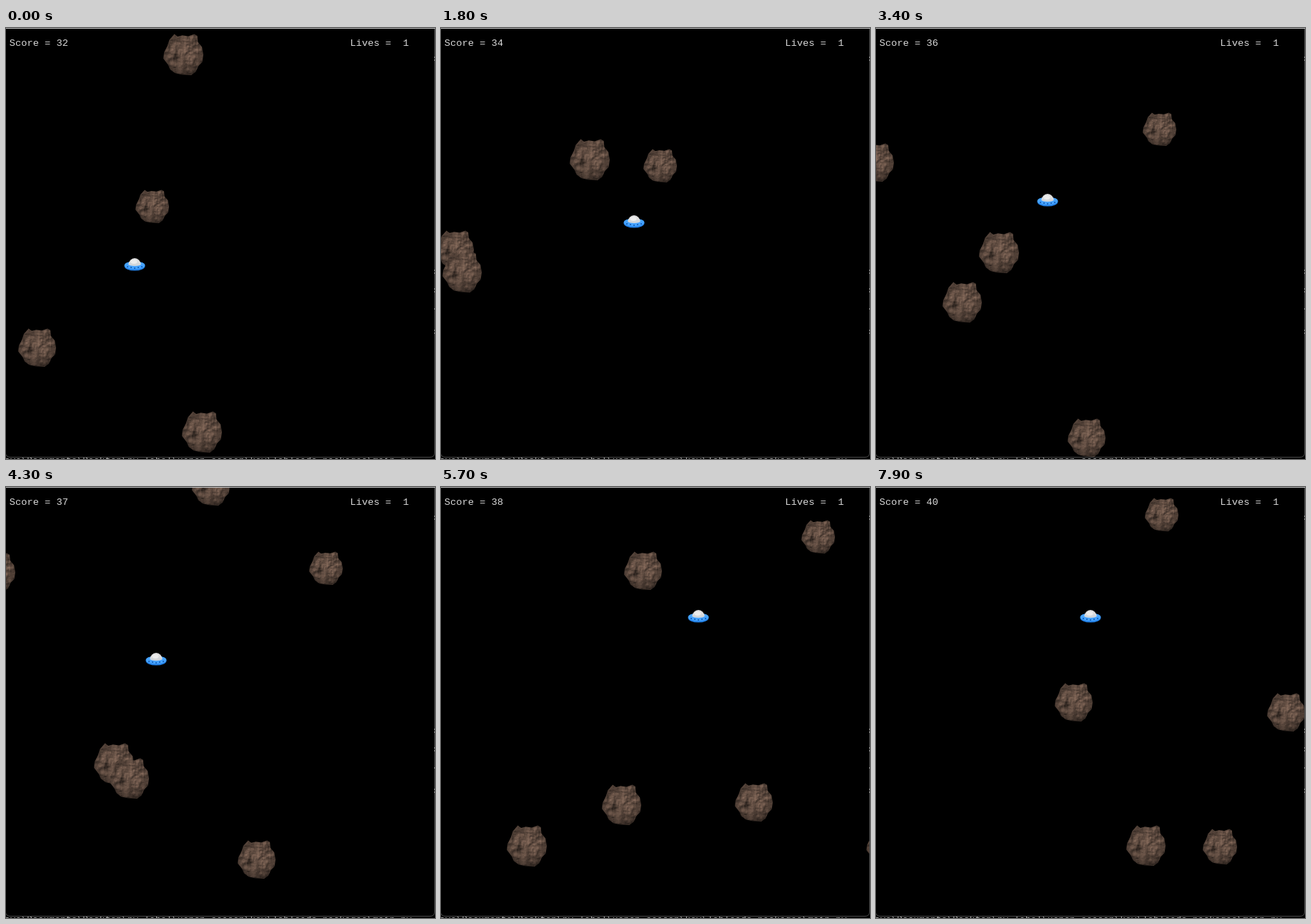
Recreate the animation shown at these times as an HTML page with a canvas. Size 600 by 603 pixels, loop 8000 ms.

```html
<!DOCTYPE html>
<html lang="en">
<head>
<meta charset="utf-8">
<title>Asteroid dodge</title>
<style>
  html, body { margin: 0; width: 600px; height: 603px; overflow: hidden; background: #000; }
  svg, canvas { position: absolute; left: 0; top: 0; display: block; }
  text { font-family: "Liberation Mono", "Courier New", monospace; white-space: pre; }
  .hud { font-size: 13.7px; fill: #d8d8d8; }
  .shell { font-size: 13px; fill: #b4b4b4; }
</style>
</head>
<body>
<svg width="600" height="603" viewBox="0 0 600 603">
  <rect width="600" height="603" fill="#000"/>
  <text class="shell" x="-2" y="609">ave\Documents\Desktop\py_label\xenon_season\key\labloads_packages\main.py</text>
  <path d="M-1 -1H599.5V594Q599.5 600.5 593 600.5H6Q0 600.5 -1 594Z" fill="#000" stroke="#4a4a4a"/>
  <rect width="600" height="1" fill="#bdbdbd"/>
  <path d="M599.5 40V46M599.5 338V346M599.5 364V370M599.5 392V396M599.5 422V428" stroke="#aaa" stroke-dasharray="2 2"/>
  <text class="hud" id="score" x="4.8" y="24.5"></text>
  <text class="hud" x="481.3" y="24.5">Lives =  1</text>
</svg>
<canvas id="stage" width="600" height="603"></canvas>
<script>
const LOOP = 8000, STEP = 100;
const ctx = document.getElementById('stage').getContext('2d');
const score = document.getElementById('score');

// x and y at time zero, speed per second, width, height
const rocks = [
  [248, 37, -22.45, 81.5, 56, 58],
  [204, 249, 56.7, -31.5, 47, 47],
  [43.5, 447, -13.3, -76.2, 53, 54],
  [273.5, 565, -49, 48, 56, 58],
  [-73, 294.2, 57.05, 26.3, 55, 57],
  [84.8, 767, 61.8, -57.2, 53, 54],
  [299.4, -361.5, -2.9, 83.9, 53, 54],
  [979, 503, -63.1, 0, 48, 50],
  [399.5, -625.6, 0, 84, 47, 47]
];

// key presses of the saucer, each one moves it by 30 pixels
const keys = [
  [300, 'R'], [600, 'R'], [900, 'U'], [1400, 'R'], [1800, 'U'], [2300, 'U'],
  [3000, 'L'], [3700, 'L'], [4400, 'R'], [4600, 'R'], [4800, 'R'], [5000, 'R'],
  [5200, 'R'], [5400, 'U'], [5600, 'U'], [6000, 'U'], [6400, 'U'],
  [6900, 'L'], [7100, 'L'], [7300, 'D'], [7600, 'D']
];
const dirs = { L: [-1, 0], R: [1, 0], U: [0, -1], D: [0, 1] };

const outline = [
  [-.45, -.98], [-.28, -.86], [-.05, -.92], [.25, -.88], [.55, -.98], [.7, -.9],
  [.73, -.6], [.93, -.36], [1, 0], [.95, .36], [.76, .55], [.62, .84], [.4, 1],
  [-.1, .97], [-.42, .9], [-.66, .72], [-.76, .5], [-1, .2], [-.96, -.1],
  [-.8, -.4], [-.7, -.7]
];

function hash(x, y) {
  const n = Math.sin(x * 127.1 + y * 311.7) * 43758.5453;
  return n - Math.floor(n);
}

function noise(x, y) {
  const ix = Math.floor(x), iy = Math.floor(y);
  const ease = f => f * f * (3 - 2 * f);
  const u = ease(x - ix), v = ease(y - iy);
  const mix = (a, b, k) => a + (b - a) * k;
  return mix(mix(hash(ix, iy), hash(ix + 1, iy), u),
             mix(hash(ix, iy + 1), hash(ix + 1, iy + 1), u), v);
}

function height(x, y) {
  let sum = 0;
  for (let o = 0, f = 3.2, a = .5; o < 4; o++, f *= 2, a *= .55) {
    sum += a * Math.abs(2 * noise(x * f + 9, y * f + 5) - 1);
  }
  return sum;
}

function makeRock(w, h) {
  const c = document.createElement('canvas');
  c.width = w;
  c.height = h;
  const g = c.getContext('2d');
  const img = g.createImageData(w, h);
  for (let j = 0; j < h; j++) {
    for (let i = 0; i < w; i++) {
      const x = 2 * i / w - 1, y = 2 * j / h - 1;
      const slope = height(x, y) - height(x - .05, y - .06);
      const pit = Math.exp(-((x + .36) ** 2 + (y - .12) ** 2) * 22);
      const round = 1.12 - .4 * (x * x + y * y) - .14 * y;
      const lum = round * (.62 + .62 * height(x, y) - 1.1 * slope) * (1 - .5 * pit);
      img.data.set([112 * lum, 89 * lum, 76 * lum, 255], (j * w + i) * 4);
    }
  }
  g.putImageData(img, 0, 0);
  g.globalCompositeOperation = 'destination-in';
  g.beginPath();
  outline.forEach(([x, y]) => g.lineTo((x + 1) * w / 2, (y + 1) * h / 2));
  g.fill();
  return c;
}

const sprites = rocks.map(r => makeRock(r[4], r[5]));

function ellipse(x, y, rx, ry, color, from = 0, to = 7) {
  ctx.fillStyle = color;
  ctx.beginPath();
  ctx.ellipse(x, y, rx, ry, 0, from, to);
  ctx.fill();
}

function drawSaucer(x, y) {
  ellipse(x, y + 2, 14.5, 6.6, '#2380e6');
  ellipse(x, y + 1, 14.3, 5.6, '#46a3ff');
  ctx.fillStyle = '#1b69c4';
  for (let k = -2; k <= 2; k++) {
    ctx.fillRect(Math.round(x + k * 5 - 1), Math.round(y + 4 - Math.abs(k)), 2, 2);
  }
  ellipse(x, y, 8.6, 9, '#dedede', Math.PI, 2 * Math.PI);
  ellipse(x, y - .5, 8.6, 2.6, '#d2d6da');
  ellipse(x - 1, y - 4, 4.5, 3, '#ececec');
}

function draw(t) {
  ctx.clearRect(0, 0, 600, 603);
  score.textContent = 'Score = ' + (32 + Math.floor((t + 800) / 1000));

  let x = 180, y = 331;
  for (const [at, key] of keys) {
    if (t < at) break;
    x += 30 * dirs[key][0];
    y += 30 * dirs[key][1];
  }
  drawSaucer(x, y);

  ctx.save();
  ctx.beginPath();
  ctx.rect(0, 1, 599, 600);
  ctx.clip();
  rocks.forEach(([x0, y0, vx, vy, w, h], i) => {
    const px = x0 + vx * t / 1000 - w / 2, py = y0 + vy * t / 1000 - h / 2;
    ctx.drawImage(sprites[i], Math.round(px), Math.round(py));
  });
  ctx.restore();
}

const start = performance.now();
function tick() {
  const t = (performance.now() - start) % LOOP;
  draw(Math.floor(t / STEP) * STEP);
  requestAnimationFrame(tick);
}
tick();
</script>
</body>
</html>
```
